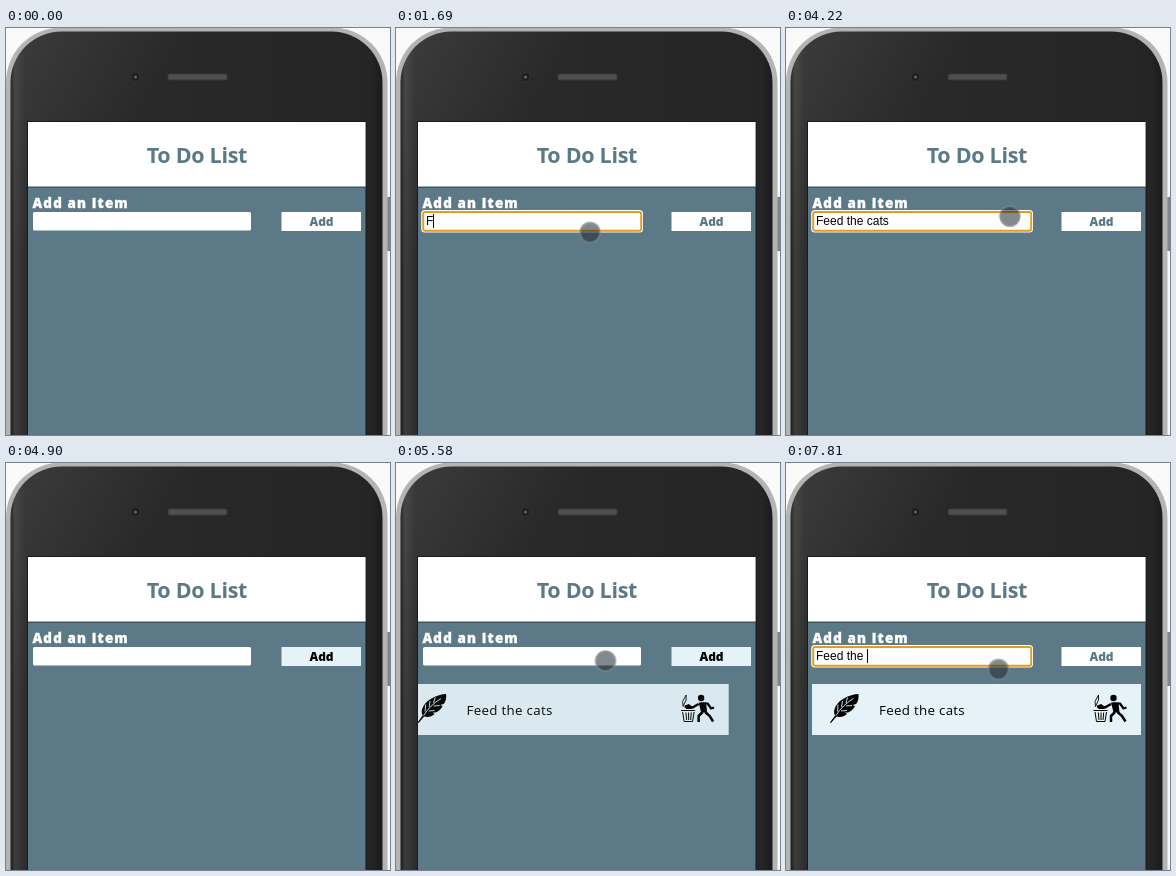
These frames come from a looping animation (384x407 px, 8 s). An HTML page:

```html
<!DOCTYPE html>
<html lang="en">
<head>
<meta charset="utf-8">
<title>To Do List</title>
<style>
  html, body { margin: 0; width: 100%; height: 100%; overflow: hidden; background: #fafafa; }
  svg { display: block; width: 384px; height: 407px; }
  text { font-family: "Open Sans", "Noto Sans", sans-serif; white-space: pre; }
  .title { font-size: 21.5px; font-weight: 700; letter-spacing: -.3px; fill: #5b7986; }
  .label { font-size: 13.4px; font-weight: 800; letter-spacing: 1.15px; fill: #fff; stroke: #fff; stroke-width: .35px; }
  .button { font-size: 12px; font-weight: 800; text-anchor: middle; }
  .entry { font-size: 13.33px; font-weight: 500; letter-spacing: .3px; }
  #typed { font: 12px "Liberation Sans", Arial, sans-serif; }
</style>
</head>
<body>
<svg viewBox="0 0 384 407">
  <defs>
    <linearGradient id="body" x1="0" x2="1" y1="0" y2="0">
      <stop offset="0" stop-color="#1c1c1c"/>
      <stop offset=".012" stop-color="#3c3c3c"/>
      <stop offset=".04" stop-color="#2d2d2d"/>
      <stop offset=".5" stop-color="#282828"/>
      <stop offset=".97" stop-color="#252525"/>
      <stop offset="1" stop-color="#1b1b1b"/>
    </linearGradient>
    <linearGradient id="sheen" x1="0" x2="1" y1="0" y2="1">
      <stop offset="0" stop-color="#fff" stop-opacity=".07"/>
      <stop offset=".25" stop-color="#fff" stop-opacity="0"/>
    </linearGradient>
    <clipPath id="screen"><rect x="22" y="94" width="337.500" height="313"/></clipPath>
  </defs>

  <!-- phone -->
  <rect x="380" y="169" width="8" height="54" fill="#858585"/>
  <rect x="0" y="-.5" width="381.500" height="500" rx="55" fill="#b3b4b4"/>
  <rect x="4.500" y="3.500" width="372" height="500" rx="51" fill="url(#body)"/>
  <rect x="4.500" y="3.500" width="372" height="500" rx="51" fill="url(#sheen)"/>
  <circle cx="129.500" cy="49" r="4.500" fill="#1d1d1d" stroke="#343434"/>
  <circle cx="129.500" cy="49" r="1.500" fill="#666"/>
  <rect x="162" y="46" width="59" height="6" rx="1.500" fill="#514e4e" stroke="#3a3838"/>
  <rect x="21" y="93" width="339.500" height="320" fill="#171b1c"/>

  <!-- screen -->
  <rect x="22" y="94" width="337.500" height="313" fill="#5b7986"/>
  <rect x="22" y="94" width="337.500" height="64.700" fill="#fff"/>
  <rect x="22" y="158.700" width="337.500" height="1" fill="#2d4a4c"/>
  <text class="title" x="140.700" y="135">To Do List</text>
  <text class="label" x="26.500" y="180">Add an Item</text>

  <rect x="27" y="184" width="218" height="18.500" rx="1.500" fill="#fff"/>
  <g id="focus" fill="#fff">
    <rect x="25.200" y="182" width="221.800" height="22.500" rx="3.500"/>
    <rect x="27.200" y="184" width="218" height="18.800" rx="2" stroke="#e59b1c" stroke-width="1.900"/>
  </g>
  <text id="typed" x="30" y="197"></text>
  <rect id="caret" y="186" width="1" height="14"/>

  <rect id="face" x="275.500" y="184" width="79.500" height="19" fill="#fff"/>
  <text id="add" class="button" x="315.500" y="198" fill="#5b7986">Add</text>

  <g clip-path="url(#screen)">
    <g id="item">
      <rect x="26" y="221" width="329" height="51" fill="#e5f3f9"/>
      <path d="M44 259.500L49 252.500C46 247 51 239 58 235.500C63 232.500 68 231 72.500 231C73 235 72 239 70 241L66.500 242L69 243C67.500 246 65 248.500 62 249.500L59 249.500L61 251C58 254 54 254.500 50.500 253.500L45 260Z"/>
      <path d="M50 252.500Q56 242.500 67.500 235.500M51.500 248.500l.5-7M55.500 244l1-6M60 240l1.500-5.500M55 248l6-.5M60 243l6-.5" fill="none" stroke="#e5f3f9" stroke-width=".9"/>
      <text class="entry" x="93" y="252">Feed the cats</text>
      <g fill="none" stroke="#000" stroke-linejoin="round">
        <path d="M312.500 232L309 238.500L309.500 243.500L312.500 237Z" stroke-width=".9"/>
        <path d="M307.500 247.500H321.500M309 249L310.500 258.500H319L320.500 249M312.300 249.500L313 257M315 249.500V257M317.700 249.500L317 257" stroke-width="1"/>
        <path d="M325 241L319 244.500L311 243.500" stroke-width="2.600"/>
        <path d="M327 240.500H334L337.500 245.500L340.500 244.500" stroke-width="2.200"/>
        <path d="M329 249L325 253V259M331.500 249L336 253L339.500 258.500" stroke-width="2.500"/>
      </g>
      <path d="M325 239.500H332.500L333.500 249.500H327.500Z"/>
      <path d="M311.500 242.500L315 241L318 243V246H312.500Z"/>
      <circle cx="327.500" cy="235" r="3.200"/>
    </g>
  </g>

  <g id="cursor">
    <circle r="10.500" fill="#222a2e" fill-opacity=".56"/>
    <circle r="10" fill="none" stroke="#a3a8aa" stroke-opacity=".45" stroke-width="1.800"/>
  </g>
</svg>
<script>
const LOOP = 8000;
const $ = id => document.getElementById(id);
const anims = [];

// each row is [ms, keyframe, easing?]
function track(id, rows) {
  const last = rows[rows.length - 1];
  const full = [[0, rows[0][1]], ...rows, [LOOP, last[1]]];
  const frames = full.map(([ms, props, easing = "linear"]) => ({ ...props, easing, offset: ms / LOOP }));
  const anim = $(id).animate(frames, { duration: LOOP, fill: "both" });
  anim.pause();
  anims.push(anim);
}

const at = (x, y, opacity = 1) => ({ transform: `translate(${x}px, ${y}px)`, opacity });

track("cursor", [
  [70, at(251, 330, 0)], [70, at(251, 330)],
  [300, at(232, 278)], [550, at(200, 212)], [750, at(188, 192)],
  [890, at(190, 196)], [1020, at(190, 198)], [1290, at(191, 199)],
  [1690, at(194, 204.5)], [1960, at(195.5, 204)],
  [3700, at(195.5, 204)], [3880, at(196, 197)], [4030, at(196, 197)],
  [4400, at(250, 180)], [4770, at(304, 190)],
  [4900, at(304, 190)], [4900, at(304, 190, 0)],
  [5030, at(304, 190, 0)], [5030, at(304, 190)],
  [5300, at(255, 186)], [5560, at(209.5, 198)],
  [6090, at(210.5, 197.3)], [6290, at(211.5, 207)],
  [7280, at(211.5, 207)], [7670, at(212.5, 206.5)]
]);

track("item", [
  [4900, at(-329, 0, 0), "ease"],
  [5900, at(0, 0)]
]);

function hover(id, rest, lit) {
  track(id, [[4900, { fill: rest }], [4900, { fill: lit }], [5640, { fill: lit }], [5900, { fill: rest }]]);
}
hover("face", "#ffffff", "#e5f3f9");
hover("add", "#5b7986", "#000000");

// focus periods with the moments of each key press
const PHRASE = "Feed the cats";
const sessions = [
  { from: 1020, to: 4900, keys: [1690, 1820, 1960, 2160, 2280, 2360, 2480, 2550, 2690, 3020, 3220, 3350, 3550] },
  { from: 5640, to: LOOP, keys: [6550, 6620, 7080, 7280, 7410, 7540, 7540, 7670, 7810] }
];
const BLINK = 530;

function show(el, on) { el.setAttribute("visibility", on ? "visible" : "hidden"); }

function input(t) {
  const s = sessions.find(s => t >= s.from && t < s.to);
  const done = s ? s.keys.filter(k => k <= t) : [];
  const typed = $("typed");
  const value = PHRASE.slice(0, done.length);
  if (typed.textContent !== value) typed.textContent = value;
  show($("focus"), s);
  let caret = false;
  if (s) {
    const since = done.length ? done[done.length - 1] : s.from - 80;
    caret = Math.floor((t - since) / BLINK) % 2 === 0;
    $("caret").setAttribute("x", Math.round(30 + (value ? typed.getComputedTextLength() : 0)));
  }
  show($("caret"), caret);
}

const start = performance.now();
function draw() {
  const t = (performance.now() - start) % LOOP;
  for (const a of anims) a.currentTime = t;
  input(t);
  requestAnimationFrame(draw);
}
draw();
</script>
</body>
</html>
```
